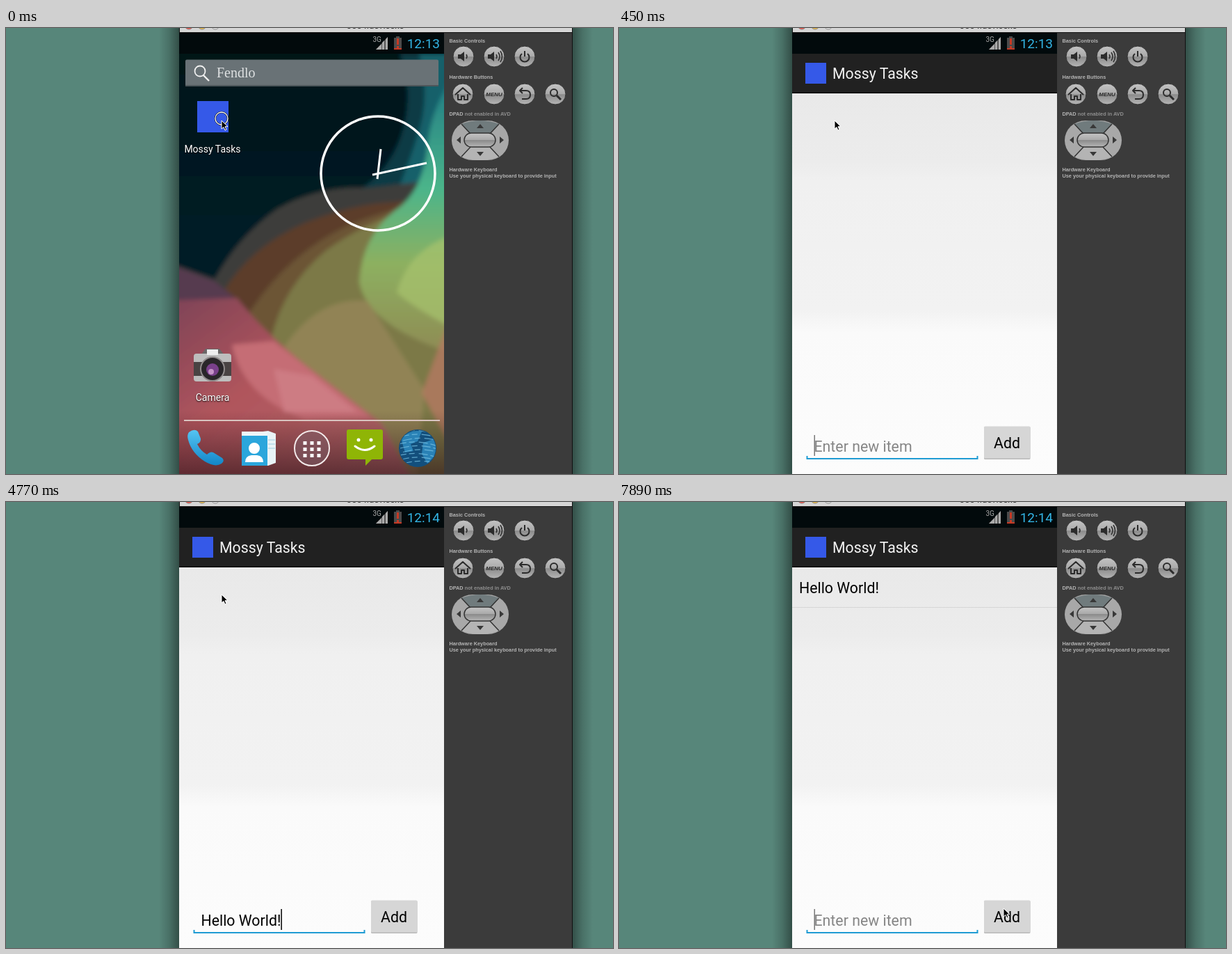
Animation, 873 px wide and 641 px high, one loop 8 s. Source, as an HTML page:

```html
<!DOCTYPE html>
<html lang="en">
<head>
<meta charset="utf-8">
<style>
  html, body { margin: 0; width: 100%; height: 100%; overflow: hidden; background: #57867a; }
  svg { display: block; }
  text { font-family: Roboto, "Noto Sans", sans-serif; white-space: pre; }
  .app text { font-size: 21.3px; }
  .label { font-size: 14px; fill: #fff; text-anchor: middle; text-shadow: 0 1px 2px #000; }
  .panel text { font: bold 7.3px "Liberation Sans", Arial, sans-serif; fill: #b4b4b4; }
  .icon { fill: none; stroke: #2b2b2b; stroke-width: 2; stroke-linejoin: round; }
</style>
</head>
<body>
<svg width="873" height="641" viewBox="0 0 873 641">
  <defs>
    <linearGradient id="shadeL"><stop stop-opacity="0"/><stop offset=".5" stop-opacity=".16"/><stop offset="1" stop-opacity=".42"/></linearGradient>
    <linearGradient id="shadeR"><stop stop-opacity=".42"/><stop offset=".5" stop-opacity=".16"/><stop offset="1" stop-opacity="0"/></linearGradient>
    <linearGradient id="night" x2="0" y2="1"><stop stop-color="#021016"/><stop offset=".5" stop-color="#061f28"/></linearGradient>
    <linearGradient id="rose" x2="1" y2="1"><stop stop-color="#7c4257"/><stop offset=".4" stop-color="#b0555c"/><stop offset="1" stop-color="#b06c6c"/></linearGradient>
    <linearGradient id="edge" x2="0" y2="1"><stop stop-color="#1b7684"/><stop offset=".42" stop-color="#4cb58a"/><stop offset=".68" stop-color="#8db060"/><stop offset="1" stop-color="#8f8a54"/></linearGradient>
    <linearGradient id="dusk" x2="0" y2="1"><stop stop-color="#2a0d14" stop-opacity="0"/><stop offset="1" stop-color="#2a0d14" stop-opacity=".6"/></linearGradient>
    <linearGradient id="page" x2="0" y2="1">
      <stop stop-color="#e9e9e9"/><stop offset=".18" stop-color="#ececec"/><stop offset=".23" stop-color="#f0f0f0"/>
      <stop offset=".57" stop-color="#f2f2f2"/><stop offset=".63" stop-color="#fafafa"/><stop offset="1" stop-color="#fcfcfc"/>
    </linearGradient>
    <linearGradient id="metal" x2="0" y2="1"><stop stop-color="#c4c4c4"/><stop offset=".5" stop-color="#a9a9a9"/><stop offset=".52" stop-color="#8b8b8b"/><stop offset="1" stop-color="#b5b5b5"/></linearGradient>
    <linearGradient id="sky" x2="0" y2="1"><stop stop-color="#55c4f2"/><stop offset="1" stop-color="#1286c8"/></linearGradient>
    <filter id="soft" x="0" y="0" width="1" height="1"><feGaussianBlur stdDeviation="3"/></filter>
    <clipPath id="screen"><path d="M249 7H630V641H249Z"/></clipPath>
    <clipPath id="ball"><circle cx="592" cy="604" r="26"/></clipPath>
  </defs>

  <!-- desktop and window frame -->
  <path fill="#57867a" d="M0 0H873V641H0Z"/>
  <path fill="url(#shadeL)" d="M220 0H249V641H220Z"/>
  <path fill="url(#shadeR)" d="M814 0H844V641H814Z"/>
  <path fill="#111" d="M249 0H815V641H249Z"/>
  <path fill="#d6d6d6" d="M250 0H814V6H250Z"/>
  <g stroke="#777" stroke-width=".7">
    <circle cx="263" cy="-4" r="6" fill="#e8594f"/><circle cx="282" cy="-4" r="6" fill="#e6b84a"/><circle cx="301" cy="-4" r="6" fill="#ddd"/>
  </g>
  <text x="531" y="1" text-anchor="middle" font-size="13" fill="#333">5554:devicexs</text>

  <!-- emulator controls -->
  <g class="panel">
    <path fill="#3b3b3b" d="M630 7H814V641H630Z"/>
    <text x="637.500" y="20.500">Basic Controls</text>
    <text x="637.500" y="72.500">Hardware Buttons</text>
    <text x="637.500" y="126">DPAD <tspan fill="#8f8f8f">not enabled in AVD</tspan></text>
    <text x="637.500" y="206">Hardware Keyboard</text>
    <text x="637.500" y="215">Use your physical keyboard to provide input</text>
    <g id="knobs" fill="url(#metal)" stroke="#333"></g>
    <g class="icon">
      <path fill="#2b2b2b" stroke="none" d="M650 38h4l5-4v14l-5-4h-4zM693 38h4l5-4v14l-5-4h-4z"/>
      <path stroke-width="1.500" d="M662 38q2 3 0 6M705 38q2 3 0 6M708 35q4 6 0 12M711 33q5 8 0 16"/>
      <path d="M742 37a6.500 6.500 0 1 0 8 0M746 33v8"/>
      <path d="M646 96l11-10 11 10M650 95v8h5v-5h4v5h5v-8"/>
      <path d="M739 90h9q6 0 6 6t-6 6h-6M743 86l-4 4 4 4"/>
      <circle cx="788" cy="93" r="5"/><path d="M792 97l6 6" stroke-width="3"/>
    </g>
    <text x="702" y="98" text-anchor="middle" style="font-size:8px;font-style:italic;fill:#2b2b2b">MENU</text>
    <rect x="641" y="133" width="82" height="57" rx="30" fill="#a8a8a8"/>
    <path fill="#707b7d" d="M655 138Q682 128 709 138L697 152H667Z"/>
    <path fill="#b4b4b4" d="M655 185Q682 195 709 185L697 171H667Z"/>
    <path stroke="#333" stroke-width="1.500" d="M655 138L668 152M709 138L696 152M655 185L668 171M709 185L696 171"/>
    <rect x="659" y="151" width="45" height="20" rx="10" fill="url(#metal)" stroke="#333" stroke-width="1.500"/>
    <path fill="#383838" d="M677 144l5-6 5 6zM677 178l5 6 5-6zM654 156l-6 5 6 5zM710 156l6 5-6 5z"/>
  </g>

  <g clip-path="url(#screen)">
    <!-- wallpaper -->
    <g filter="url(#soft)">
      <path fill="url(#night)" d="M230 0H650V660H230Z"/>
      <path fill="#0a3a45" d="M566 37C592 100 575 190 510 232L650 270V37Z"/>
      <path fill="#12606a" d="M594 37Q612 100 590 160Q574 210 560 240L650 300V37Z"/>
      <path fill="#3d3c3a" d="M230 336L300 361Q334 300 390 260Q450 226 520 230L650 215V660H230Z"/>
      <path fill="#5b3d2c" d="M230 360L312 380Q350 315 430 280Q500 252 560 250L650 240V660H230Z"/>
      <path fill="#6c5534" d="M340 425Q390 340 470 295Q530 262 650 240V660H340Z"/>
      <path fill="#7c7947" d="M382 444Q400 370 460 320Q530 268 650 240V660H500Z"/>
      <path fill="url(#edge)" d="M650 60Q612 110 606 170Q600 235 560 262Q512 300 508 365Q520 430 650 470Z"/>
      <path fill="#a9c46e" fill-opacity=".7" d="M650 295Q580 315 562 380Q590 405 650 435Z"/>
      <path fill="#978658" fill-opacity=".8" d="M400 458Q450 385 520 392L602 520L590 660L520 610Z"/>
      <path fill="#b57a62" fill-opacity=".8" d="M650 385L598 525L650 620Z"/>
      <path fill="#573a50" d="M230 338L300 364L332 390L300 430L230 455Z"/>
      <path fill="url(#rose)" d="M230 392L332 388Q372 438 430 484L540 568L590 660H230Z"/>
      <path fill="#c56d75" d="M325 455L385 450L525 560L430 562Q340 530 325 455Z"/>
      <path fill="#cd7c83" d="M385 490L440 500L505 552L400 552Z"/>
    </g>
    <path fill="url(#dusk)" d="M249 550H630V641H249Z"/>

    <!-- home screen -->
    <rect x="258" y="45.500" width="364" height="38" rx="2" fill="#697276"/>
    <path fill="#4d565a" d="M258 82H622V84H258Z"/>
    <circle cx="279" cy="62" r="7.500" fill="none" stroke="#f0f0f0" stroke-width="1.800"/>
    <path stroke="#f0f0f0" stroke-width="2.400" d="M284 68l8 8"/>
    <text x="303" y="71" style="font:20px 'Liberation Serif',Times,serif" fill="#dde0e1">Fendlo</text>
    <rect x="275" y="105" width="45" height="45" fill="#3559e8"/>
    <text class="label" x="297" y="179">Mossy Tasks</text>
    <g fill="none" stroke="#fff">
      <circle cx="535" cy="209" r="82" stroke-width="3.500"/>
      <path stroke-width="3" d="M539 174L534 217M527 211L605 194"/>
    </g>
    <path fill="#6a6767" d="M280 470l7-9h20l7 9z"/>
    <rect x="270" y="468" width="54" height="40" rx="4" fill="#bdbdbd"/>
    <path fill="#494343" d="M270 480h54v20h-54z"/>
    <path fill="#eee" d="M289 462h16v8h-16z"/>
    <circle cx="297" cy="490" r="17" fill="#292629" stroke="#918c8c" stroke-width="2"/>
    <circle cx="297" cy="491" r="9" fill="#79408a"/><circle cx="295" cy="494" r="4" fill="#c594c7"/>
    <text class="label" x="297" y="536">Camera</text>
    <path fill="#d9c4c0" d="M256 563H624V565H256Z"/>

    <path fill="url(#sky)" d="M263 581q8-6 13-1l4 10q1 5-5 8 5 10 14 15 5-5 9-3l13 8q4 4-1 8-9 6-24-3-19-12-24-31-2-7 1-11z"/>
    <path fill="#e9f3f7" d="M339 584l38-5 11 4v42l-11 4-38-2z"/>
    <path fill="#2ba6dc" d="M339 582h37v47h-37z"/>
    <path fill="#eef6f9" d="M339 580h37v6h-37z"/>
    <path stroke="#9dcde0" d="M377 592h10M377 598h10M377 604h10"/>
    <path fill="#fff" d="M344 624q0-9 9-10h8q9 1 9 10z"/>
    <circle cx="357" cy="604" r="9" fill="#fff" stroke="#2ba6dc" stroke-width="2"/>
    <circle cx="440" cy="604" r="25" fill="#80606a" fill-opacity=".5" stroke="#f3eaea" stroke-width="2"/>
    <path id="dots" fill="#fff"/>
    <path fill="#8fb506" d="M493 577h46q3 0 3 3v37q0 3-3 3h-13l-9 9v-9h-24q-3 0-3-3v-37q0-3 3-3z"/>
    <path fill="none" stroke="#fff" stroke-width="3" stroke-linecap="round" d="M502 601q14 11 28 0"/>
    <circle cx="507" cy="592" r="2.500" fill="#fff"/><circle cx="525" cy="592" r="2.500" fill="#fff"/>
    <circle cx="592" cy="604" r="27" fill="#134f7c"/>
    <g clip-path="url(#ball)">
      <path fill="#2a82b6" d="M568 590q14-14 30-10l-6 14-10 4 4 10-12 2zM600 596l18-6v24l-12 12-8-14z"/>
      <path id="waves" fill="none" stroke="#79c3e4" stroke-opacity=".75" stroke-width="1.200" stroke-dasharray="13 4 8 6"/>
    </g>

    <!-- task app -->
    <g id="app" class="app">
      <path fill="url(#page)" d="M249 94H630V641H249Z"/>
      <path fill="#212121" d="M249 37H630V94H249Z"/>
      <path fill="#0c0c0c" d="M249 92.500H630V94H249Z"/>
      <rect x="268" y="50" width="30" height="30" fill="#3559e8"/>
      <text x="307" y="73" fill="#f3f3f3">Mossy Tasks</text>
      <g id="item">
        <text x="259" y="130.500">Hello World!</text>
        <path fill="#d6d6d6" d="M249 151H630V152H249Z"/>
      </g>
      <g id="form">
        <path fill="none" stroke="#1f9bd3" stroke-width="2" d="M270.500 615V619H515.500V615"/>
        <text id="hint" x="280.500" y="608.500" fill="#858585">Enter new item</text>
        <text id="typed" x="280.500" y="608.500"></text>
        <rect id="caret" y="585" width="1.500" height="30"/>
        <rect x="525" y="573" width="66.500" height="47" rx="1.500" fill="#b9b9b9"/>
        <rect x="525" y="572.500" width="66.500" height="46" rx="1.500" fill="#d6d6d6"/>
        <text x="539" y="603.500">Add</text>
      </g>
    </g>

    <!-- status bar -->
    <path fill="#020a0c" d="M249 7H630V37H249Z"/>
    <text x="527.500" y="20" font-size="10" fill="#aaa">3G</text>
    <path fill="#555" d="M549 13V31H532Z"/><path fill="#aaa" d="M540 23V31H532ZM544 18V31H541V21ZM549 13V31H546V16Z"/>
    <path fill="#4b4b4b" d="M561 12h5v2h3v17h-11V14h3z"/><path fill="#c63a25" d="M562 15h3v9h-3zM562 26h3v3h-3zM558 29h11v2h-11z"/>
    <text id="clock" x="624" y="29" font-size="19" text-anchor="end" fill="#33b5e5"></text>
  </g>

  <g id="mouse">
    <g id="press" fill="none"><circle cy="-3" r="9" stroke="#222" stroke-width="2.500"/><circle cy="-3" r="9" stroke="#fff" stroke-width="1.300"/></g>
    <path stroke="#fff" d="M0 0V12L3 9.500L5 14L7 13L5 8.700H9Z"/>
  </g>
</svg>
<script>
const $ = id => document.getElementById(id);
const show = (id, on) => $(id).setAttribute('visibility', on ? 'inherit' : 'hidden');
const LOOP = 8000;

$('knobs').innerHTML = [[658, 41], [702, 41], [746, 41], [657, 95], [702, 95], [746, 95], [790, 95]]
  .map(([x, y]) => `<circle cx="${x}" cy="${y}" r="15"/>`).join('');
$('dots').setAttribute('d', Array.from({ length: 9 }, (_, i) =>
  `M${427.5 + i % 3 * 10} ${594 + Math.floor(i / 3) * 9}h5v5h-5z`).join(''));
$('waves').setAttribute('d', Array.from({ length: 9 }, (_, i) =>
  `M${563 + i % 3 * 4} ${582 + i * 5.5}q28 -8 56 2`).join(''));

const message = 'Hello World!';
const keyTimes = [2230, 2530, 2680, 2820, 3120, 3570, 3870, 4020, 4170, 4320, 4470, 4770];
const caretOff = [[740, 1340], [1780, 2230], [5370, 5820], [6260, 6700], [7440, 7890]];
// time, x, y of the pointer
const pointer = [
  [0, 310, 133], [5370, 360, 205], [5520, 476, 361], [5670, 492, 415],
  [5820, 514, 517], [5960, 541, 577], [6110, 550, 583], [6260, 553, 584]
];

// The window grows from its launcher cell (p = 0) to the full screen (p = 1).
function placeApp(p) {
  const sx = (96 + 285 * p) / 381, sy = (117 + 487 * p) / 604, top = 37 + 57 * (1 - p);
  $('app').setAttribute('transform', `translate(249 ${top}) scale(${sx} ${sy}) translate(-249 -37)`);
  $('form').setAttribute('opacity', p < 1 ? 0.45 : 1);
}

function draw(t) {
  const added = t >= 6850;
  const typed = added ? '' : message.slice(0, keyTimes.filter(k => k <= t).length);
  const [, x, y] = pointer.findLast(p => p[0] <= t);

  show('app', t >= 300);
  placeApp(t < 450 ? 0.716 : 1);
  show('item', added);
  show('hint', !typed);
  $('typed').textContent = typed;
  $('caret').setAttribute('x', 280.5 + (typed ? $('typed').getComputedTextLength() : 0));
  $('caret').setAttribute('fill', typed ? '#000' : '#777');
  show('caret', !caretOff.some(([a, b]) => t >= a && t < b));
  $('clock').textContent = t < 2230 ? '12:13' : '12:14';
  $('mouse').setAttribute('transform', `translate(${x} ${y})`);
  show('press', t < 150 || (t >= 6700 && t < 6850));
}

function tick() {
  draw(performance.now() % LOOP);
  requestAnimationFrame(tick);
}
tick();
</script>
</body>
</html>
```
